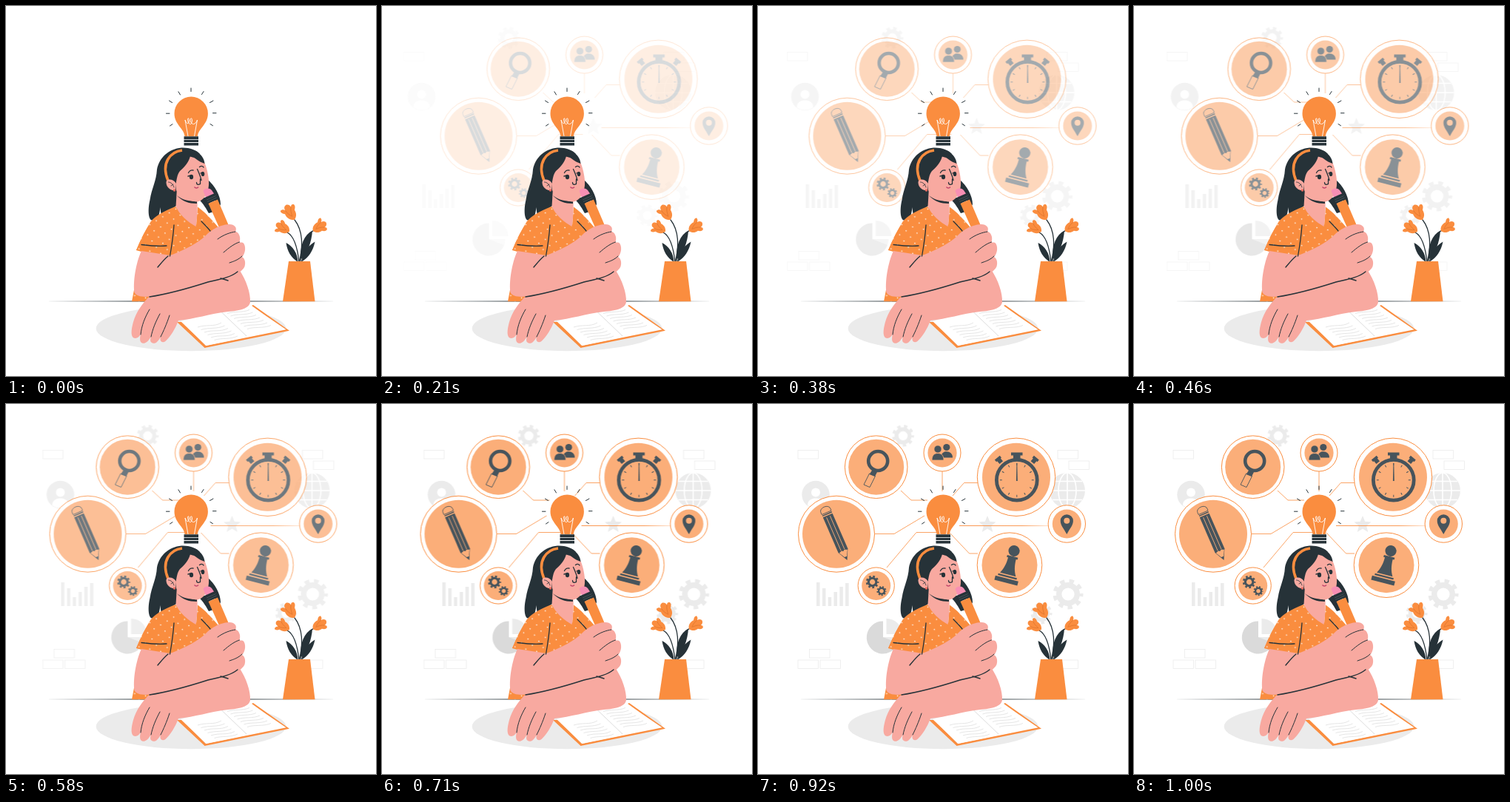
Animation of 500x500 px, one loop 1.04 s. Source, as an HTML page without scripts:

```html
<!DOCTYPE html>
<html lang="en">
<head>
<meta charset="utf-8">
<title>Thinking up ideas</title>
<style>
  html, body { margin: 0; width: 100%; height: 100%; overflow: hidden; background: #fff; }
  svg { display: block; width: 100%; height: 100%; }

  .ideas, .backdrop { animation: drift 1040ms linear infinite; }
  .ideas { --from: 33px; --rest: -2px; --end: 2.5px; }
  .backdrop { --from: -33px; --rest: 2px; --end: -2.5px; color: #ebebeb; }

  /* 24 steps per second: slide in while fading, then sway back */
  @keyframes drift {
    0% { opacity: 0; transform: translateX(var(--from)); }
    8% { opacity: 0; transform: translateX(var(--from)); animation-timing-function: steps(14, end); }
    64% { opacity: 1; transform: translateX(var(--rest)); animation-timing-function: steps(9, end); }
    100% { opacity: 1; transform: translateX(var(--end)); }
  }

  .orange { fill: #fa8d3f; }
  .skin { fill: #f8a9a0; }
  .dark { fill: #263238; }
  .white { fill: #fff; }
  .grey { fill: #ebebeb; }
  .icon { color: #47545c; fill: #47545c; }
  .line { fill: none; stroke: #263238; stroke-linecap: round; stroke-linejoin: round; }
  .link { fill: none; stroke: #fa8d3f; stroke-width: .8; }
  .ring { fill: #fff; stroke: #fa8d3f; stroke-width: 1; }
  .disc { fill: #fbae79; }
  .edge { fill: none; stroke: #47545c; }
  .brick { fill: none; stroke: #ebebeb; stroke-width: .8; }
  .script { fill: none; stroke: #d4d4d4; stroke-width: .6; }
</style>
</head>
<body>
<svg viewBox="0 0 500 500">
  <defs>
    <g id="gear" fill="none" stroke="currentColor">
      <circle r=".6" stroke-width=".36"/>
      <circle r=".86" stroke-width=".28" pathLength="16" stroke-dasharray="1" stroke-dashoffset=".5"/>
    </g>
    <rect id="brick" class="brick" width="27.5" height="11.5"/>
    <g id="bloom">
      <path class="orange" d="M0 12C-6 10-8 4-7-1C-9-3-11-5-10-8C-7-9-5-7-4-5C-4-9-2-11 1-11C4-10 5-8 5-5C6-7 8-8 10-6C11-3 9-1 7 1C7 6 5 10 0 12Z"/>
      <path d="M-4-5C-4 0-2 4 0 7M5-5C2-2 1 2 0 6" fill="none" stroke="#d86f29" stroke-width=".6"/>
    </g>
    <pattern id="dots" width="15" height="14" patternUnits="userSpaceOnUse" patternTransform="rotate(12)">
      <rect class="orange" width="15" height="14"/>
      <circle class="white" cx="4" cy="3.5" r=".85"/>
      <circle class="white" cx="11.5" cy="10.5" r=".85"/>
    </pattern>
    <linearGradient id="fade" gradientUnits="userSpaceOnUse" x1="272" x2="392">
      <stop stop-color="#fa8d3f"/>
      <stop offset=".7" stop-color="#fa8d3f"/>
      <stop offset="1" stop-color="#fa8d3f" stop-opacity=".3"/>
    </linearGradient>
  </defs>

  <g class="backdrop">
    <use href="#brick" x="55" y="62.5"/>
    <use href="#brick" x="406" y="62.5"/>
    <use href="#brick" x="421" y="77"/>
    <use href="#brick" x="70.5" y="331.5"/>
    <use href="#brick" x="55" y="346"/>
    <use href="#brick" x="85" y="346"/>
    <use href="#brick" x="406" y="346"/>
    <use href="#gear" transform="translate(197 43) scale(14.8)"/>
    <use href="#gear" transform="translate(420 257) scale(20.5)"/>
    <use href="#gear" transform="translate(384 283) scale(14.5)"/>
    <g class="grey">
      <circle cx="79" cy="122.5" r="18.7"/>
      <path d="M80 241h4.500v32H80ZM88 249h4.500v24H88ZM95.700 261h4.500v12h-4.500ZM103.500 254h4.500v19h-4.500ZM111.300 247h4.500v26h-4.500ZM119.100 242h4.500v31h-4.500Z"/>
      <path d="M311 151l3.200 7.700 8.300.7-6.300 5.400 2 8.100-7.200-4.300-7.200 4.300 2-8.100-6.300-5.400 8.300-.7Z"/>
      <circle cx="419" cy="117" r="24"/>
      <path d="M174.500 311V290A21.500 21.500 0 0 1 196 311Z"/>
      <path d="M170 315h22A22 22 0 0 1 190 324Z"/>
    </g>
    <path d="M170 315V293.500A22 22 0 1 0 190.500 323Z" fill="#dadada"/>
    <circle class="white" cx="79" cy="119.5" r="6"/>
    <path class="white" d="M68 137C68 130 73 127.500 79 127.500S90 130 90 137A19 19 0 0 1 68 137Z"/>
    <g fill="none" stroke="#fff" stroke-width="1.6">
      <path d="M419 93V141M395 117H443M399 104.500H439M399 129.500H439"/>
      <ellipse cx="419" cy="117" rx="12" ry="24"/>
    </g>
  </g>

  <g class="ideas">
    <path class="link" d="M192 117L206 130H228M248 91V118M296 106.500H277.500L262 124M157 175.500H183L224 151M296 202H284.500L258 174M173 221L213 173.500H246"/>
    <path d="M271 164.500L392 164.600" fill="none" stroke="url(#fade)" stroke-width=".9"/>

    <g class="ring">
      <circle cx="105" cy="175.7" r="51.5"/>
      <circle cx="158.7" cy="85.2" r="42.3"/>
      <circle cx="248" cy="66" r="25"/>
      <circle cx="348" cy="98.8" r="52.7"/>
      <circle cx="416.3" cy="162" r="25.2"/>
      <circle cx="339" cy="217.7" r="43.8"/>
      <circle cx="158.7" cy="245.5" r="24.6"/>
    </g>
    <g class="disc">
      <circle cx="105" cy="175.7" r="46"/>
      <circle cx="158.7" cy="85.2" r="37.5"/>
      <circle cx="248" cy="66" r="19.6"/>
      <circle cx="348" cy="98.8" r="46"/>
      <circle cx="416.3" cy="162" r="19.5"/>
      <circle cx="339" cy="217.7" r="37.5"/>
      <circle cx="158.7" cy="245.5" r="19.5"/>
    </g>

    <!-- pencil -->
    <g class="icon" transform="translate(88 138.5) rotate(-23.5)">
      <path d="M-7 13H7V65L0 79L-7 65Z"/>
      <path class="disc" d="M-6 66L-2 64.500L0 66L2 64.500L6 66L1.800 74H-1.800Z"/>
      <path class="edge" d="M-7 9V6C-7-1 7-1 7 6V9Z" stroke-width=".8"/>
      <path class="edge" d="M-7 11H7" stroke-width="1.5"/>
      <path d="M-2.600 15V64M2.600 15V64" fill="none" stroke="#fbae79" stroke-width=".8"/>
    </g>

    <!-- magnifier -->
    <g class="icon">
      <circle class="edge" cx="161.2" cy="77" r="13" stroke-width="4.6"/>
      <path d="M153.500 89L160 92L157 98L149.500 95Z"/>
      <path class="edge" d="M149.500 94L157.500 97.500L150 112.500L142 109Z" stroke-width=".9"/>
    </g>

    <!-- people -->
    <g class="icon">
      <circle cx="253.8" cy="58.5" r="4.6"/>
      <path d="M246.500 72.500C246.500 66 250 64.300 254 64.300S262 67 262 72.500Z"/>
      <path d="M234 76C234 69 237.500 66.600 242 66.600S250 69 250 76Z" stroke="#fbae79" stroke-width=".8"/>
      <circle cx="242" cy="61" r="5" stroke="#fbae79" stroke-width=".6"/>
    </g>

    <!-- stopwatch -->
    <g class="icon">
      <circle class="edge" cx="348.8" cy="102.7" r="27.4" stroke-width="4.8"/>
      <circle class="edge" cx="348.8" cy="102.7" r="21.5" stroke-width="3" pathLength="120" stroke-dasharray=".9 9.1" stroke-dashoffset=".45"/>
      <path d="M341 65.500h15.500v4h-3v5.500h-9.500v-5.500h-3Z"/>
      <path d="M347.900 104L348.400 80H349.300L349.800 104Z"/>
      <path id="knob" d="M-4.500-5h9v3.500h-1.500v5h-6v-5h-1.500Z" transform="translate(325.5 76.5) rotate(-40)"/>
      <use href="#knob" transform="matrix(-1 0 0 1 697.6 0)"/>
    </g>

    <!-- pin -->
    <g class="icon">
      <path d="M416.300 176C412 168 407.700 164 407.700 157.800A8.600 8.600 0 0 1 424.900 157.800C424.900 164 420.600 168 416.300 176Z"/>
      <circle class="disc" cx="416.3" cy="157.8" r="4"/>
    </g>

    <!-- pawn -->
    <g class="icon" transform="translate(345 198.5) rotate(14.5)">
      <circle r="7.6"/>
      <path d="M-7.500 7.500H7.500V10.500H5.500C5.500 20 7.500 27 11 33H-11C-7.500 27-5.500 20-5.500 10.500H-7.500Z"/>
      <path d="M-13 34.500H13V37H-13ZM-16 38.500H16V44.500H-16Z"/>
    </g>

    <!-- gears -->
    <g class="icon">
      <use href="#gear" transform="translate(153.6 240.5) scale(8.8)"/>
      <use href="#gear" transform="translate(166 252.7) scale(6.6)"/>
    </g>
  </g>

  <!-- bulb -->
  <path class="orange" d="M241.500 176C241 166 227.500 160 227.500 145.200A22.700 22.700 0 0 1 272.900 145.200C272.900 160 259.500 166 259 176Z"/>
  <path d="M242 154L246 176M258.500 154L254.500 176M242 154C244 160 247 160 247.500 155C247.500 150 244.500 151 246 156C248 162 251 160 251.500 155C251.500 150 248.500 151 249.500 156C251 161 256 161 258.500 154" fill="none" stroke="#fff" stroke-width=".9"/>
  <path class="dark" d="M240.500 176.300h19.500v3.600h-19.500ZM240.500 180.700h19.500v3.400h-19.500ZM240.500 185h19.500v3.600h-19.500Z"/>
  <path class="line" stroke-width="1" d="M250 111V115.500M233 115.800L235.500 120M267 115.500L264.500 119.500M220.500 128L224.500 130.500M280 128L275.500 130.500M216.500 145.200H221M279.500 144.700H284M221.500 162L225 159.700M276 159.500L279.500 161.700"/>

  <!-- floor and table -->
  <ellipse class="grey" cx="250" cy="435.7" rx="128.3" ry="30.5"/>
  <path class="dark" d="M50 399L250 398.300L450 399L250 399.800Z"/>

  <!-- flowers -->
  <path class="line" stroke-width="1.3" d="M396 346C402 325 401 303 390 289M396 346C394 328 390 311 380 306M398 346C400 327 405 310 416 303"/>
  <path class="dark" d="M378.500 320C388 325 394 334 394.500 346C385 340 380 331 378.500 320ZM414 303.500C403 309 397 323 398 343C407 334 413 320 414 303.500ZM417.500 318.500C407 325 401 334 399 346C409 340 415 331 417.500 318.500Z"/>
  <use href="#bloom" transform="translate(383.5 278.500) rotate(-32)"/>
  <use href="#bloom" transform="translate(373.5 299.500) rotate(-62) scale(.9)"/>
  <use href="#bloom" transform="translate(424 298) rotate(55) scale(.92)"/>
  <path class="orange" d="M382 345H411L417.500 399.300H374Z"/>

  <!-- hair behind -->
  <path class="dark" d="M237 191.500C220 193 207 205 204 221C203 237 197 246 194.500 262C191 277 193 289 197 289.500C202 290 207 288 208.500 272C209 281 211 287 213 286.500C217 281 222 274 229 271L236 262V225L262 200C257 194 247 191 237 191.500Z"/>
  <path class="dark" d="M273 235C282 243 290 256 290 268C288 272 286 274 284.500 276C285 264 281 252 272 246ZM260 261C267 267 271 275 274 280L279 278.500L272 258Z"/>

  <!-- shirt -->
  <path fill="url(#dots)" d="M229 271C212 278 201 284 196 291C189 302 182 315 176 330L183 332L170 399.300H200L255 350L297 310C285 298 273 281 259 271.500L257 296Z"/>
  <path class="skin" d="M231 246L229.500 271C235 283 246 292 256.500 298C258 289 259 279 258.500 262Z"/>
  <path class="dark" d="M231 256C238 262 247 264 258 264V267C247 267 238 264 231 256Z"/>

  <!-- face -->
  <path class="skin" d="M229 230L246 203C256 205 265 208 268.500 212C272 221 274.500 232 274 242C273 254 267 264 257 264.500C245 263 234 257 230 249Z"/>
  <path class="dark" d="M250 198.500C248 211 241 218 235 223C231 228 231 234 229.500 240L219 237L213 225C215 207 228 194 242 193C258 193 268 203 268.500 213C260 210 253 205 250 198.500Z"/>
  <path d="M238 195C222 197 209 212 219 236" fill="none" stroke="#fa8d3f" stroke-width="3.6"/>
  <path class="skin" d="M230 240C226 233 216 233 216.500 239C217 245 222 250 229 249Z"/>
  <path class="line" stroke-width=".8" d="M219.500 238C223 238 226 241 227 245M223 243L226 241"/>
  <circle cx="227.5" cy="249" r="1.7" fill="#e86b60"/>
  <ellipse class="dark" cx="250.5" cy="231" rx="2.6" ry="3.2"/>
  <ellipse class="dark" cx="266" cy="227" rx="2.3" ry="3.1"/>
  <path class="line" stroke-width="1.3" d="M246.500 225.500C248 222.500 250.500 221.500 253 222M261.500 217.500C263.500 216 265.500 216 267 218M246 230L250 229M263 226L266 224.500M258.500 220.500C261 226 263 231 264 235.500M262.500 234V240.500M257.500 238.500C257.500 241.500 260 242 262 240.500"/>
  <path d="M254.500 244.500C256 246.500 258.500 246.500 260 244.500" fill="none" stroke="#c2456b" stroke-width="1.3"/>

  <!-- notebook -->
  <path class="orange" d="M231 427L268.500 462L383 438.800L334 404L332 405L376 437L270 459L238 427Z"/>
  <path class="white" d="M236 426L270.500 459L378.500 437.300L331 405L290 411Z"/>
  <path d="M290 412.500L325 446" fill="none" stroke="#d8d8d8" stroke-width=".9"/>
  <path class="script" d="M299 415.500C309 412 319 415 329 410.500M303.500 419C313 415.500 323 418.500 333.500 414M308 422.500C317 419 328 422 338 417.500M312.500 426C322 422.500 333 425.500 343 421M317 429.500C326 426 338 429 348 424.500M321.500 433C331 429.500 343 432.500 353 428M326 436.500C335 433 348 436 358 431.500"/>
  <path class="script" d="M259 434C271 430 281 434 291 428M263.500 437.500C275 434 285 437 295.500 432M268 441C279 437 290 441 300 435.500M272.500 444.500C284 441 294 444 304.500 439M277 448C288 444 299 448 309 442.500M281.500 451.500C292 448 303 451 313 446"/>

  <!-- resting arm and hand -->
  <path class="skin" d="M192 394C220 384 260 374 300 365L315 356C325 371 330.500 388 330 400C329 409 315 412 300 413C275 416 255 423 233 425C229 436 222 447 215.500 453C211 456 207 453 209 447C206 453 202 457 198 455.500C194 454 195 450 196 446C193 453 188 457 184 455.500C180 454 181 448 182 443C180 448 176 450 172.500 448.500C168 446 169.500 436 172 427C176 413 184 403 192 394Z"/>
  <path class="line" stroke-width="1" d="M194 410C188 420 183 432 182 444M208 416C202 427 198 437 196 447M221 418C217 430 213 439 209 447"/>

  <!-- held pencil -->
  <path d="M266.500 250C268 246 275 245 278 249L282 255L270.500 260Z" fill="#f88fb4"/>
  <path class="dark" d="M269.500 258.500L282 253L286 261.500L273.500 267Z"/>
  <path class="orange" d="M273.500 267L286 261.500L302 299L291 306Z"/>
  <path d="M271 262L283.500 256.500M272 264.500L284.700 259" fill="none" stroke="#5c686e" stroke-width=".6"/>

  <!-- raised arm and fist -->
  <path class="skin" d="M183 331C175 348 171.500 374 173.500 387C177 394 190 394 205 391C235 386 262 375 289 369C305 367 319 360 322.500 352C324 347 323 341 319 339C324 334 324.500 324 320.500 320C318 319 316 320 315.500 319C318 312 314 305 310 305C313 299 308 294.500 301 295C288 296 278 302 270 310C260 320 243 329 222 337Z"/>
  <path class="line" stroke-width="1" d="M310 305C303 306 294 309 286 315M315.500 319C309 321 302 326 294 333M319 338C314 343 308 345 302 347"/>
  <path class="line" stroke-width="1.4" d="M194 393C220 389 245 382 273 373C285 370 302 368 313 359M290 368C294 369 297 370 300 371M205 353C210 347 214 342 219 338"/>

  <!-- sleeve over the arm -->
  <path fill="url(#dots)" d="M196 291C189 302 182 315 176 330C190 331.500 206 332 222 331L227 296Z"/>
  <path class="line" stroke-width="1.3" d="M227 296C226 310 224 324 221.500 338M183 322.500C195 324 207 325 217 324M264 291C269 296 273 300 276 304"/>
</svg>
</body>
</html>
```
